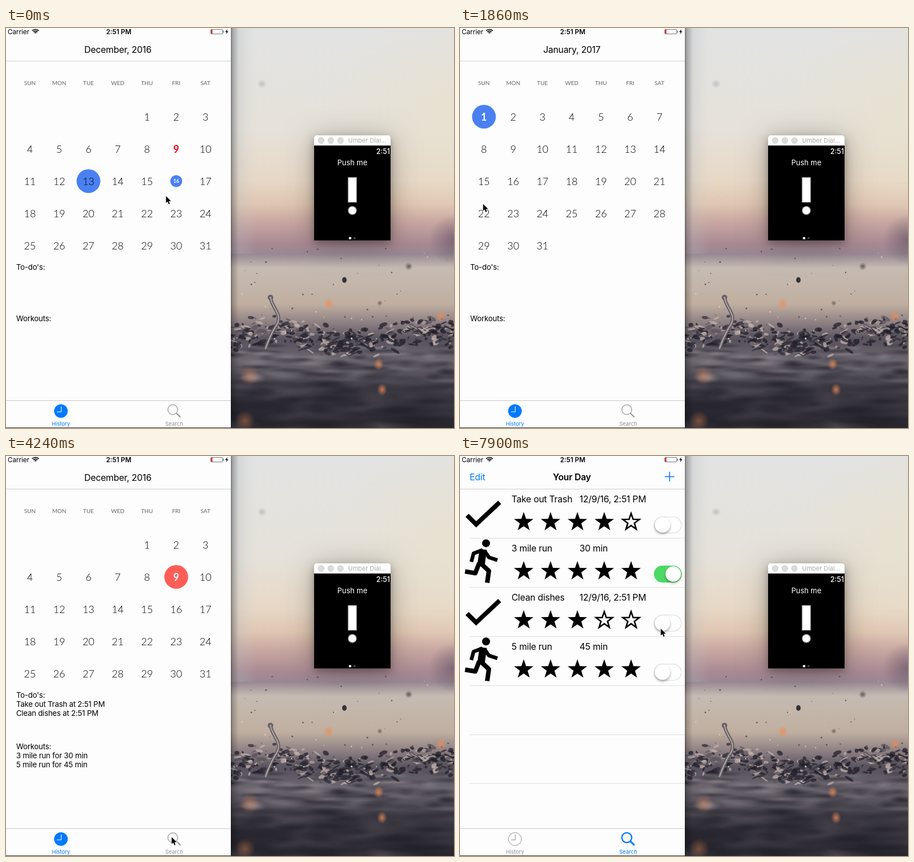
An HTML page with a canvas that plays this animation: 791x708 px, repeating every 7990 ms.

```html
<!DOCTYPE html>
<html lang="en">
<head>
<meta charset="utf-8">
<title>Calendar and to-do app</title>
<style>
  html, body { margin: 0; width: 100%; height: 100%; overflow: hidden; background: #fdfdfd; }
  canvas { display: block; }
</style>
</head>
<body>
<canvas id="stage" width="791" height="708"></canvas>
<script>
const LOOP = 7990, TAU = Math.PI * 2;
const BLUE = '#007aff', GREY = '#929292', PICK = '#4a80f2', RED = '#ff5e57';
const UI = 'Inter, sans-serif', ROUND = 'Lato, sans-serif';
const COLUMN = 51.65, PAGE = COLUMN * 7, ROW = 86.9;
const stage = document.getElementById('stage').getContext('2d');
let ctx = stage;

// Timing
const ramp = (t, a, b) => Math.max(0, Math.min(1, (t - a) / (b - a)));
const mix = (a, b, k) => a + (b - a) * k;
const smooth = k => k * k * (3 - 2 * k);
const pop = (t, a, b) => mix(1, .55, (1 - ramp(t, a, b)) ** 3);

// Pointer strokes: start, end, x, y
const MOVES = [[240, 1400, 40, 311], [1860, 2210, 130, 300], [2300, 2770, 467, 262],
  [2770, 3120, 342, 236], [3120, 3620, 183, 540], [3700, 4240, 292, 674], [4950, 5340, 231, 440],
  [5460, 5690, 331, 169], [5870, 6110, 358, 186], [6110, 6380, 359, 210],
  [7200, 7430, 352, 356], [7430, 7900, 354, 305]];
const pointerAt = t => MOVES.reduce(([x, y], [a, b, toX, toY]) => {
  const k = ramp(t, a, b);
  return [mix(x, toX, k), mix(y, toY, k)];
}, [282, 297]);

// Drawing helpers
function text(str, x, y, size, { color = '#000', weight = 400, align = 'left', font = UI, spacing = 0 } = {}) {
  ctx.font = `${weight} ${size}px ${font}`;
  ctx.letterSpacing = spacing + 'px';
  ctx.textAlign = align;
  ctx.fillStyle = color;
  ctx.fillText(str, x, y);
}
const body = (str, x, y, options) => text(str, x, y, 15.8, { spacing: -0.2, ...options });

function rect(x, y, w, h, color) {
  ctx.fillStyle = color;
  ctx.fillRect(x, y, w, h);
}
function ellipse(x, y, rx, ry, color, turn = 0) {
  ctx.beginPath();
  ctx.ellipse(x, y, rx, ry, turn, 0, TAU);
  ctx.fillStyle = color;
  ctx.fill();
}
const disc = (x, y, r, color) => ellipse(x, y, r, r, color);

function stroke(color, width) {
  ctx.strokeStyle = color;
  ctx.lineWidth = width;
  ctx.stroke();
}
function ring(x, y, r, color, width, from = 0, to = TAU) {
  ctx.beginPath();
  ctx.arc(x, y, r, from, to);
  stroke(color, width);
}
function trace(points) {
  ctx.beginPath();
  for (let i = 0; i < points.length; i += 2) ctx.lineTo(points[i], points[i + 1]);
}
function line(points, color, width) {
  trace(points);
  stroke(color, width);
}
function polygon(points, color) {
  trace(points);
  ctx.closePath();
  ctx.fillStyle = color;
  ctx.fill();
}
function box(x, y, w, h, r, color) {
  ctx.beginPath();
  ctx.roundRect(x, y, w, h, r);
  ctx.fillStyle = color;
  ctx.fill();
}
function gradient(x0, y0, x1, y1, stops) {
  const g = ctx.createLinearGradient(x0, y0, x1, y1);
  stops.forEach(([at, color]) => g.addColorStop(at, color));
  return g;
}
function shadow(color, blur, y) {
  ctx.shadowColor = color;
  ctx.shadowBlur = blur;
  ctx.shadowOffsetY = y;
}
const noShadow = () => shadow('transparent', 0, 0);

function glow(x, y, rx, ry, rgb, alpha) {
  ctx.save();
  ctx.translate(x, y);
  ctx.scale(rx, ry);
  const g = ctx.createRadialGradient(0, 0, 0, 0, 0, 1);
  g.addColorStop(0, `rgba(${rgb},${alpha})`);
  g.addColorStop(1, `rgba(${rgb},0)`);
  disc(0, 0, 1, g);
  ctx.restore();
}

// Desktop: soft dusk sky above dark splashing water
function randomizer(seed) {
  return (a, b) => mix(a, b, (seed = (seed * 16807) % 2147483647) / 2147483647);
}

function drawSky() {
  rect(397, 0, 394, 708, gradient(0, 0, 0, 708, [
    [0, '#e2e3e3'], [.25, '#e6e2da'], [.38, '#e7d8c6'], [.44, '#dfc6b2'], [.48, '#cbaaa3'], [.54, '#a88992'],
    [.565, '#988892'], [.6, '#c6bbb2'], [.69, '#c0afa0'], [.74, '#8a7d81'], [.78, '#57525d'],
    [.83, '#6c666f'], [.89, '#45424c'], [1, '#2a2930']]));
  glow(791, 150, 220, 190, '232,224,200', .6);
  glow(791, 375, 45, 45, '95,80,100', .6);
  rect(397, 0, 45, 400, gradient(397, 0, 442, 0, [[0, 'rgba(170,174,180,.4)'], [1, 'rgba(200,204,206,0)']]));
  glow(452, 99, 9, 8, '150,150,150', .45);
}

function drawWater() {
  const between = randomizer(77);
  const pick = (...tones) => tones[Math.floor(between(0, tones.length))];
  for (let i = 0; i < 190; i++) {
    const near = between(0, 1);
    glow(between(397, 791), 560 + 150 * near, between(14, 40) * (1 + near), between(3, 6) * (1 + 2 * near),
      pick('32,31,40', '32,31,40', near < .45 ? '160,150,156' : '84,78,86'), between(.25, .6));
  }
  for (let i = 0; i < 420; i++) {
    const x = between(397, 791), y = 548 + 10 * Math.sin(x / 43) + between(-17, 17) + between(-14, 14);
    const tone = pick('34,32,43', '34,32,43', '48,45,57', '92,84,92', '192,176,170');
    ellipse(x, y, between(1.5, 9), between(1, 4), `rgba(${tone},.75)`, between(-.6, .6));
  }
  for (let i = 0; i < 90; i++) {
    const height = between(0, 1) ** 2.5;
    disc(between(397, 791), 550 - 160 * height, between(.4, 1.6), pick('#5c555b', '#5c555b', '#d7c6b8'));
  }
  [[658, 595], [664, 640], [570, 488], [768, 510], [430, 615], [422, 695]].forEach(([x, y], i) =>
    glow(x, y, i < 4 ? 9 : 18, i < 4 ? 11 : 18, '238,140,85', i < 4 ? .8 : .4));

  for (const [color, width] of [['#625d66', 6], ['#b5a8a2', 2]]) {
    ctx.beginPath();
    ctx.moveTo(467, 477);
    ctx.bezierCurveTo(470, 498, 492, 508, 475, 530);
    ctx.quadraticCurveTo(466, 545, 458, 568);
    stroke(color, width);
    disc(467, 477, width * .8, color);
  }
  ellipse(597.5, 446, 4, 5, '#333238');
  glow(711, 422, 7, 7, '75,65,70', .8);
  glow(660, 487, 5, 5, '75,65,70', .7);
}

function drawWatch() {
  for (const blur of [50, 14]) {
    shadow('rgba(0,0,0,.3)', blur, 5);
    box(544, 190, 135, 186, [5, 5, 0, 0], '#fff');
  }
  noShadow();
  for (let i = 0; i < 3; i++) {
    disc(556.5 + 17 * i, 199, 5.5, '#dcdcdc');
    ring(556.5 + 17 * i, 199, 5, '#cecece', 1);
  }
  text('Umber Dial...', 604, 203, 11, { color: '#aaa' });
  rect(544, 208, 135, 168, '#000');
  text('2:51', 678, 222.5, 12.5, { color: '#fff', weight: 500, align: 'right' });
  text('Push me', 611.5, 243, 13, { color: '#fff', align: 'center' });
  rect(603.5, 264, 16, 45, '#888');
  rect(604.5, 265, 14, 43, '#fff');
  disc(611.5, 323, 8, '#777');
  disc(611.5, 323, 6.8, '#fff');
  disc(607.5, 372, 2.3, '#fff');
  disc(615.5, 372, 2, '#444');
}

function drawDesktop() {
  drawSky();
  drawWater();
  rect(397, 0, 14, 708, gradient(397, 0, 411, 0, [[0, 'rgba(0,0,0,.42)'], [.25, 'rgba(0,0,0,.2)'], [1, 'rgba(0,0,0,0)']]));
  drawWatch();
}

// Phone frame
function drawStatusBar() {
  text('Carrier', 3, 11, 11.7);
  text('2:51 PM', 199, 11, 11.7, { weight: 600, align: 'center' });
  for (let i = 0; i < 3; i++) ring(52, 10.5, 2.2 + 2.9 * i, '#000', 1.7, -TAU * .38, -TAU * .12);
  ctx.beginPath();
  ctx.roundRect(361.5, 2.5, 21, 8, 1.5);
  stroke('#777', 1);
  rect(362, 3, 2.5, 7, '#f32b2b');
  rect(383.5, 5, 1.5, 3.5, '#777');
  polygon([391, 2, 387, 7, 389.5, 7, 388.5, 11, 392.5, 5.8, 390, 5.8], '#000');
}

function drawTabs(listOpen) {
  rect(0, 659, 397, 1, '#c9c9c9');
  if (listOpen) ring(97, 678, 11.5, GREY, 1);
  else disc(97, 678, 12, BLUE);
  line([97.5, 670, 97.5, 679.5, 90, 679.5], listOpen ? GREY : '#fff', 1);
  const color = listOpen ? BLUE : GREY, width = listOpen ? 2.3 : 1.2;
  ring(294.5, 675.5, 8.7, color, width);
  line([300.8, 681.8, 308, 689], color, width + .8);
  text('History', 97, 704, 9.5, { align: 'center', color: listOpen ? GREY : BLUE });
  text('Search', 297, 704, 9.5, { align: 'center', color });
}

// Calendar screen
function drawDay(day, x, y, { color, scale = 1, today, plain }) {
  if (color) disc(x, y, 21 * scale, color);
  const marked = color && !plain;
  text(day, x, y + 6.5 * scale, 18 * scale, {
    font: ROUND, align: 'center',
    weight: marked || today ? 700 : 300,
    color: marked ? '#fff' : today ? '#f00818' : '#000'
  });
}

function drawMonth(left, firstColumn, styles) {
  for (let day = 1; day <= 31; day++) {
    const cell = day - 1 + firstColumn;
    drawDay(day, left + 42.3 + COLUMN * (cell % 7), 157 + 57 * Math.floor(cell / 7), styles[day] || {});
  }
}

function drawMonthTitle(str, y, stretch, alpha) {
  if (alpha <= 0) return;
  ctx.save();
  ctx.globalAlpha = alpha;
  ctx.translate(197.5, y);
  ctx.scale(1, stretch);
  body(str, 0, 5.5, { align: 'center' });
  ctx.restore();
}

function drawHeading(t) {
  const back = t > 2300, start = back ? 3000 : 1400;
  const p = ramp(t, start, start + 360);
  const titles = ['December, 2016', 'January, 2017'];
  if (back) titles.reverse();
  ctx.save();
  ctx.beginPath();
  ctx.rect(0, 19, 397, 39);
  ctx.clip();
  drawMonthTitle(titles[0], 38 - 21 * p, 1 + 2.1 * p, 1 - 1.2 * p);
  drawMonthTitle(titles[1], 38 + 24 * (1 - p), .1 + .9 * p, 2 * p - 1);
  ctx.restore();
}

function drawCalendar(t) {
  drawHeading(t);
  'SUN MON TUE WED THU FRI SAT'.split(' ').forEach((name, i) =>
    text(name, 42.3 + COLUMN * i, 100.5, 10, { font: ROUND, align: 'center', color: '#666' }));

  const todaySelected = t >= 3000;
  const december = { 9: { today: true } };
  if (t < 90) december[13] = { color: PICK, plain: true };
  if (t < 1500) december[16] = { color: PICK, scale: t < 90 ? .5 : 1 };
  if (todaySelected) december[9] = { color: RED, scale: pop(t, 3000, 3260) };
  const january = t < 1500 ? {} : { 1: { color: PICK, scale: pop(t, 1500, 1760) } };

  const offset = PAGE * (smooth(ramp(t, 240, 1580)) - smooth(ramp(t, 2300, 3000)));
  ctx.save();
  ctx.beginPath();
  ctx.rect(16, 120, 363, 290);
  ctx.clip();
  drawMonth(-offset, 4, december);
  drawMonth(PAGE - offset, 0, january);
  ctx.restore();

  const notes = (lines, y) => lines.slice(0, todaySelected ? 3 : 1).forEach((str, i) =>
    text(str, 18, y + 16.2 * i, 13.3, { spacing: -0.2 }));
  notes(["To-do's:", 'Take out Trash at 2:51 PM', 'Clean dishes at 2:51 PM'], 427.5);
  notes(['Workouts:', '3 mile run for 30 min', '5 mile run for 45 min'], 518.5);
}

// List screen
function drawStar(x, y, filled) {
  const radius = filled ? 18 : 15.3, points = [];
  for (let i = 0; i < 10; i++) {
    const r = i % 2 ? radius * .4 : radius, a = i * TAU / 10 - TAU / 4;
    points.push(x + r * Math.cos(a), y + r * Math.sin(a));
  }
  if (filled) return polygon(points, '#000');
  trace(points);
  ctx.closePath();
  stroke('#000', 2.6);
}

function drawRunner(y) {
  ctx.save();
  ctx.translate(0, y);
  disc(46, 9, 7, '#000');
  ctx.lineJoin = 'round';
  line([41, 20, 37, 48], '#000', 13);
  line([40, 21, 24, 27, 20, 42], '#000', 6.5);
  line([43, 22, 51, 34, 66, 39], '#000', 6.5);
  line([34, 44, 27, 62, 9, 59], '#000', 8);
  line([38, 46, 51, 58, 48, 79], '#000', 8);
  ctx.restore();
}

function drawSwitch(y, on) {
  box(342.5, y - 15, 49, 30, 15, '#e4e4e4');
  box(344, y - 13.5, 46, 27, 13.5, '#fff');
  ctx.globalAlpha = on;
  box(342.5, y - 15, 49, 30, 15, '#4cd964');
  ctx.globalAlpha = 1;
  shadow('rgba(0,0,0,.35)', 4, 2.5);
  disc(357.5 + 19 * on, y, 13.6, '#fff');
  noShadow();
}

const TASKS = [['Take out Trash', '12/9/16, 2:51 PM', 4], ['3 mile run', '30 min', 5],
  ['Clean dishes', '12/9/16, 2:51 PM', 3], ['5 mile run', '45 min', 5]];

function drawList(t) {
  body('Edit', 17, 43, { color: BLUE });
  body('Your Day', 197.5, 43, { align: 'center', weight: 600 });
  line([361.5, 36.5, 378.5, 36.5], BLUE, 1.6);
  line([370, 28, 370, 45], BLUE, 1.6);
  for (let i = 1; i <= 6; i++) rect(16, Math.round(58 + ROW * i), 381, 1, '#dedede');
  TASKS.forEach(([name, detail, stars], i) => {
    const top = 58.5 + ROW * i;
    if (i % 2) drawRunner(top);
    else line([12.5, top + 46.5, 28.5, top + 62.5, 70, top + 23.5], '#000', 8);
    body(name, 91, top + 23.5);
    body(detail, 211, top + 23.5);
    for (let s = 0; s < 5; s++) drawStar(112.5 + 47.4 * s, top + 58.5, s < stars);
    drawSwitch(top + 63.5, i === 1 ? smooth(ramp(t, 6900, 7190)) : 0);
  });
}

function drawPointer(t) {
  const dragging = t >= 240 && t < 1140;
  if (dragging) return;
  const [x, y] = pointerAt(t);
  const arrow = [0, 0, 0, 14.5, 3.3, 11.5, 5.8, 17, 8, 16, 5.7, 10.7, 10.5, 10.5];
  ctx.save();
  ctx.translate(x + .5, y + .5);
  ctx.scale(.85, .85);
  trace(arrow);
  ctx.closePath();
  stroke('#fff', 1.8);
  polygon(arrow, '#000');
  ctx.restore();
}

const desktop = document.createElement('canvas');
desktop.width = 791;
desktop.height = 708;
ctx = desktop.getContext('2d');
drawDesktop();
ctx = stage;

function render(t) {
  const listOpen = t >= 4950;
  ctx.drawImage(desktop, 0, 0);
  rect(0, 0, 397, 708, '#fdfdfd');
  rect(0, 58, 397, 1, '#cfcfcf');
  drawStatusBar();
  (listOpen ? drawList : drawCalendar)(t);
  drawTabs(listOpen);
  rect(0, 707, 397, 1, '#3a3a40');
  drawPointer(t);
}

const start = performance.now();
function frame() {
  render((performance.now() - start) % LOOP);
  requestAnimationFrame(frame);
}
frame();
</script>
</body>
</html>
```
